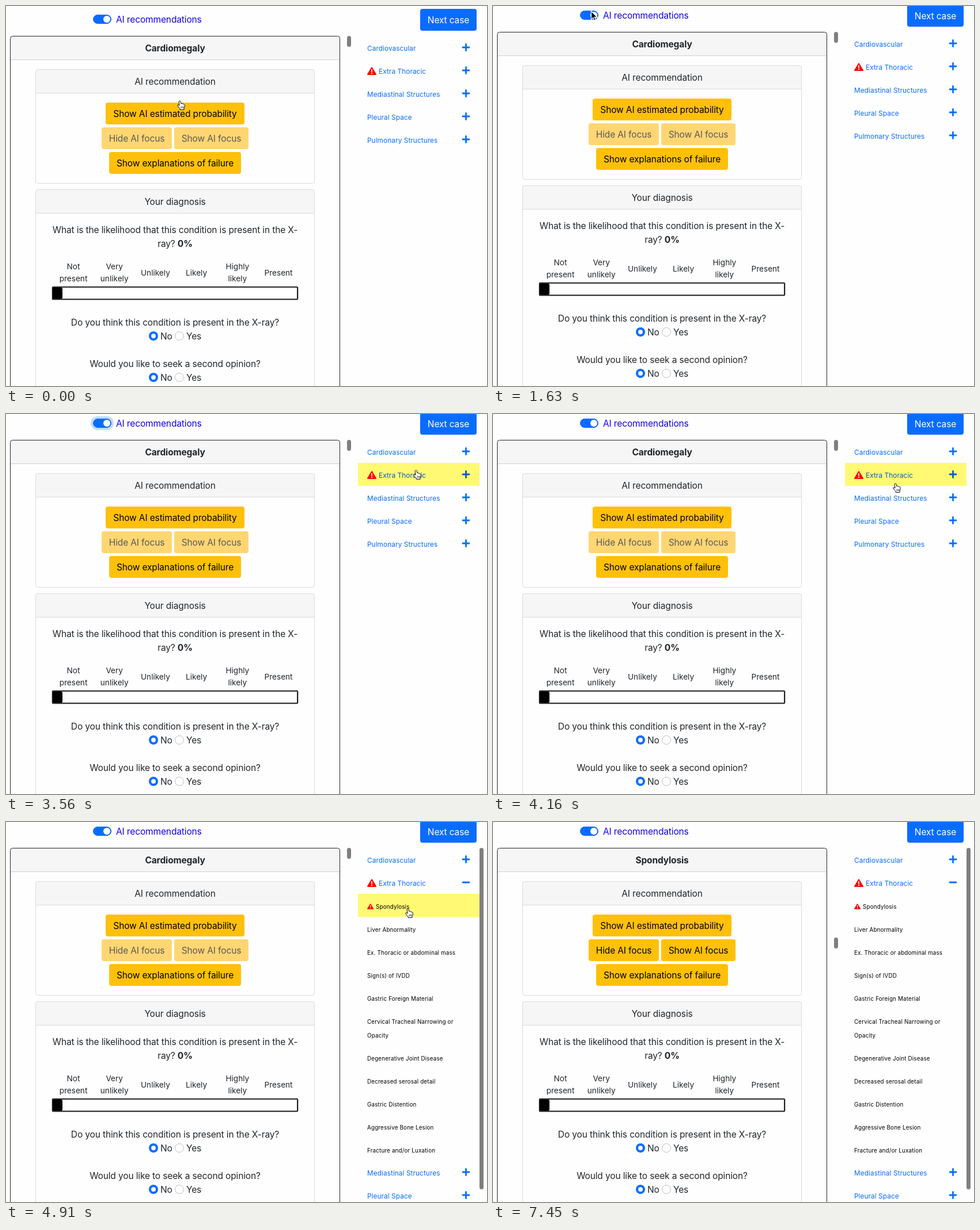
An HTML page for the animation above (7900 ms loop, 835 px wide and 661 px high).

```html
<!DOCTYPE html>
<html lang="en">
<head>
<meta charset="utf-8">
<title>AI recommendations</title>
<style>
  html, body { margin: 0; width: 100%; height: 100%; overflow: hidden; background: #fefefe; }
  svg { display: block; width: 835px; height: 661px; }
  text { font: 15.5px Inter, "Open Sans", sans-serif; letter-spacing: -.13px; fill: #212529; }
  .mid { text-anchor: middle; }
  .bold { font-weight: 700; }
  .scale { font-size: 13.6px; letter-spacing: 0; }
  .group { font-size: 11.8px; letter-spacing: .08px; fill: #0a6cff; }
  .item { font-size: 9.8px; letter-spacing: .18px; fill: #000; }
  .plus { stroke: #0a6cff; stroke-width: 2.8; stroke-linecap: round; fill: none; }
  .hot .group { fill: #0a58ca; }
  .hot .plus { stroke: #0a58ca; }
</style>
</head>
<body>
<svg id="stage" viewBox="0 0 835 661" xmlns="http://www.w3.org/2000/svg"></svg>
<script>
const LOOP = 7900;
const BLUE = '#0a6cff', YELLOW = '#ffc00a', PALE = '#ffd672', RED = '#f00';
const MID = 293.5;

// ---- markup helpers ----
const text = (x, y, s, cls = '', attrs = '') => `<text x="${x}" y="${y}" class="${cls}" ${attrs}>${s}</text>`;
const rect = (x, y, w, h, r, attrs) => `<rect x="${x}" y="${y}" width="${w}" height="${h}" rx="${r}" ${attrs}/>`;
const group = (id, body, attrs = '') => `<g id="${id}" ${attrs}>${body}</g>`;

function card(x, y, w, h, head, border) {
  const line = y + 41.5;
  return `<path d="M${x + .5} ${line}V${y + 4.5}q0-4 4-4H${x + w - 4.5}q4 0 4 4V${line}Z" fill="#f6f6f6"/>` +
    `<path d="M${x} ${line}h${w}" stroke="${head}"/>` +
    rect(x + .5, y + .5, w - 1, h - 1, 4, `fill="none" stroke="${border}"`);
}

function button(x, y, w, label, fill, ink, id = '') {
  return group(id, rect(x, y, w, 38, 4, `fill="${fill}"`) +
    text(x + w / 2, y + 25, label, 'mid', `style="fill:${ink}"`));
}

function radios(y) {
  return `<circle cx="256" cy="${y}" r="8" fill="${BLUE}"/><circle cx="256" cy="${y}" r="3.9" fill="#fff"/>` +
    `<circle cx="301" cy="${y}" r="7.5" fill="#fff" stroke="#bfbfbf"/>` +
    text(268, y + 6, 'No') + text(313, y + 6, 'Yes');
}

function warning(x, y, s) {
  return `<g transform="translate(${x} ${y}) scale(${s})">` +
    `<path d="M8 1.2L15 13H1Z" fill="${RED}" stroke="${RED}" stroke-width="2" stroke-linejoin="round"/>` +
    `<path d="M8 4.6v4" stroke="#fff" stroke-width="1.7" stroke-linecap="round"/>` +
    `<circle cx="8" cy="11.2" r="1.1" fill="#fff"/></g>`;
}

const plus = y => `<path class="plus" d="M793 ${y}h11M798.5 ${y - 5.5}v11"/>`;
const minus = y => `<path class="plus" d="M793 ${y}h11"/>`;
const section = (label, y) => text(627, y, label, 'group') + plus(y - 6);
const thumb = (id, x, y, h) => rect(x, y, 7, h, 3.5, `fill="#7f7f7f" id="${id}"`);

// ---- page parts ----
function header() {
  return rect(149, 6, 36, 20, 10, 'id="ring" fill="none" stroke="#c2daff" stroke-width="4"') +
    rect(151.5, 8.5, 31, 15, 7.5, 'id="track"') +
    '<circle id="knob" cy="16" r="6"/>' +
    text(191, 22, 'AI recommendations', '', 'style="fill:#1200ea"') +
    button(719, -2, 98, 'Next case', BLUE, '#fff', 'next');
}

function scale() {
  const labels = ['Not present', 'Very unlikely', 'Unlikely', 'Likely', 'Highly likely', 'Present'];
  return labels.map((label, i) => {
    const x = 117 + 71.2 * i, words = label.split(' ');
    const top = words.length > 1 ? 451 : 462;
    return words.map((w, k) => text(x, top + 21 * k, w, 'mid scale')).join('');
  }).join('') +
    rect(80, 481, 427, 23, 2, 'fill="none" stroke="#b0b0b0" stroke-width="1.4"') +
    rect(81, 482, 425, 21, 1, 'fill="#fff" stroke="#000" stroke-width="1.7"') +
    rect(81, 482.5, 17, 20, 3, 'fill="#000"');
}

function form() {
  return card(7, 45, 573, 700, '#cfcfcf', '#212529') +
    text(MID, 72, '', 'mid bold', 'id="title"') +
    card(51, 103, 485, 199, '#dadada', '#dadada') +
    text(MID, 130, 'AI recommendation', 'mid') +
    button(173, 161, 241, 'Show AI estimated probability', YELLOW, '#000') +
    button(166, 204, 122, 'Hide AI focus', PALE, '#595959', 'hide') +
    button(292, 204, 129, 'Show AI focus', PALE, '#595959', 'show') +
    button(179, 247, 229, 'Show explanations of failure', YELLOW, '#000') +
    card(51, 312, 485, 400, '#dadada', '#dadada') +
    text(MID, 339, 'Your diagnosis', 'mid') +
    text(MID, 388, 'What is the likelihood that this condition is present in the X-', 'mid') +
    text(MID, 412, 'ray? <tspan class="bold">0%</tspan>', 'mid') +
    scale() +
    text(MID, 549, 'Do you think this condition is present in the X-ray?', 'mid') + radios(567) +
    text(MID, 621, 'Would you like to seek a second opinion?', 'mid') + radios(639) +
    thumb('formThumb', 592, 45, 19);
}

function sidebar() {
  const items = ['Liver Abnormality', 'Ex. Thoracic or abdominal mass', 'Sign(s) of IVDD',
    'Gastric Foreign Material', 'Cervical Tracheal Narrowing or', 'Opacity',
    'Degenerative Joint Disease', 'Decreased serosal detail', 'Gastric Distention',
    'Aggressive Bone Lesion', 'Fracture and/or Luxation'];
  const itemY = i => 191 + 40 * i - (i > 4 ? 16 : 0);
  const tail = ['Mediastinal Structures', 'Pleural Space', 'Pulmonary Structures'];
  const rest = y => tail.map((s, i) => section(s, y + 40 * i)).join('');
  return rect(611, 0, 211, 40, 0, 'id="hover" fill="#fff973"') +
    section('Cardiovascular', 71) +
    group('extra', group('alert', warning(627, 99, 1)) +
      text(647, 111, 'Extra Thoracic', 'group', 'id="extraLabel"') +
      group('closedMark', plus(105)) + group('openMark', minus(105))) +
    group('closed', rest(151)) +
    group('open', warning(627, 142, .7) + text(642, 151, 'Spondylosis', 'item') +
      items.map((s, i) => text(627, itemY(i), s, 'item')).join('') +
      rest(615) + thumb('listThumb', 822, 45, 594));
}

const hand = '<path d="M4.5 1C5.6.8 6.2 1.6 6.3 2.6L6.7 5.6C7.2 5.1 8.5 5.2 8.8 6.1 9.5 5.6 10.7 5.9 11 6.9' +
  ' 11.9 6.5 13 7 13.2 8.2 13.5 10 13.1 12 12.2 13.6L12 16.3H5.3L5 14.6C3.6 13.4 2.3 11.3 1.2 9.9' +
  ' .3 8.8.8 7.6 2 7.8 2.8 7.9 3.4 8.6 4 9.2L3.2 3C3.1 1.8 3.5 1.1 4.5 1Z" fill="#fff" stroke="#000" stroke-linejoin="round"/>' +
  '<path d="M7 10.8v3M9 10.8v3M11 10.8v3" stroke="#000" stroke-width=".8"/>';
const arrow = '<path d="M0 0V14.2L3.3 11.2 5.5 16.3 8 15.2 5.8 10.3H10.3Z" fill="#000" stroke="#fff" stroke-width="1.2"/>';

const stage = document.getElementById('stage');
stage.innerHTML = group('page', header() + form() + sidebar()) + group('hand', hand) + group('arrow', arrow);
const el = id => document.getElementById(id);
const set = (id, attrs) => { for (const k in attrs) el(id).setAttribute(k, attrs[k]); };
const show = (id, on) => set(id, { visibility: on ? 'visible' : 'hidden' });

// ---- timeline: each entry holds until the next ----
const pointer = [
  [0, 'hand', 297, 164],
  [750, 'hand', 294, 158], [900, 'arrow', 276, 112], [1050, 'arrow', 246, 64], [1200, 'arrow', 214, 24],
  [1350, 'arrow', 190, 3], [1500, 'arrow', 177, 5], [1630, 'arrow', 170.5, 9],
  [3260, 'arrow', 330, 40], [3410, 'arrow', 590, 88], [3560, 'hand', 707, 97],
  [3710, 'hand', 700, 110], [3860, 'hand', 694, 120], [4460, 'hand', 692, 171],
  [4760, 'hand', 692, 157], [4910, 'hand', 693, 150],
  [5960, 'hand', 727, 70], [6110, 'hand', 744, 24], [6260, 'hand', 752, 14],
  [7000, 'hand', 796, 20], [7150, 'arrow', 825, 260], [7300, 'arrow', 827, 626], [7450, 'none', 0, 0]
];
const hover = [[0, null], [3560, 85], [4460, 165], [4760, 125], [6110, null]];
const knob = [[0, 1], [1920, .5], [2070, 0], [2660, .5], [2810, 1]];
const at = (track, t) => track.filter(k => k[0] <= t).pop();
const within = (t, a, b) => t >= a && t < b;

function paintButton(id, fill, ink) {
  const g = el(id);
  g.firstChild.setAttribute('fill', fill);
  g.lastChild.style.fill = ink;
}

function draw(t) {
  const off = within(t, 1920, 2660), open = t >= 4310, picked = t >= 5210;
  set('page', { transform: `translate(0 ${t < 150 ? 7 : 0})` });

  const k = at(knob, t)[1];
  show('ring', within(t, 1920, 4160));
  set('track', { fill: off ? '#fff' : BLUE, stroke: off ? '#86b7fe' : BLUE });
  set('knob', { cx: 159 + 16 * k, fill: off ? '#86b7fe' : '#fff' });

  const row = at(hover, t)[1];
  show('hover', row !== null);
  set('hover', { y: row || 0 });
  set('extra', { class: row === 85 ? 'hot' : '' });
  show('alert', !off);
  set('extraLabel', { x: off ? 627 : 647 });
  show('closed', !open);
  show('closedMark', !open);
  show('open', open);
  show('openMark', open);

  el('title').textContent = picked ? 'Spondylosis' : 'Cardiomegaly';
  for (const id of ['hide', 'show']) paintButton(id, picked ? YELLOW : PALE, picked ? '#000' : '#595959');
  set('formThumb', { y: picked ? 201 : 45 });
  paintButton('next', within(t, 6110, 7150) ? '#0b5ed7' : BLUE, '#fff');

  const [, kind, x, y] = at(pointer, t);
  for (const id of ['hand', 'arrow']) {
    show(id, kind === id);
    set(id, { transform: `translate(${x} ${y})` });
  }
}

const start = performance.now();
function tick() {
  draw((performance.now() - start) % LOOP);
  requestAnimationFrame(tick);
}
tick();
</script>
</body>
</html>
```
